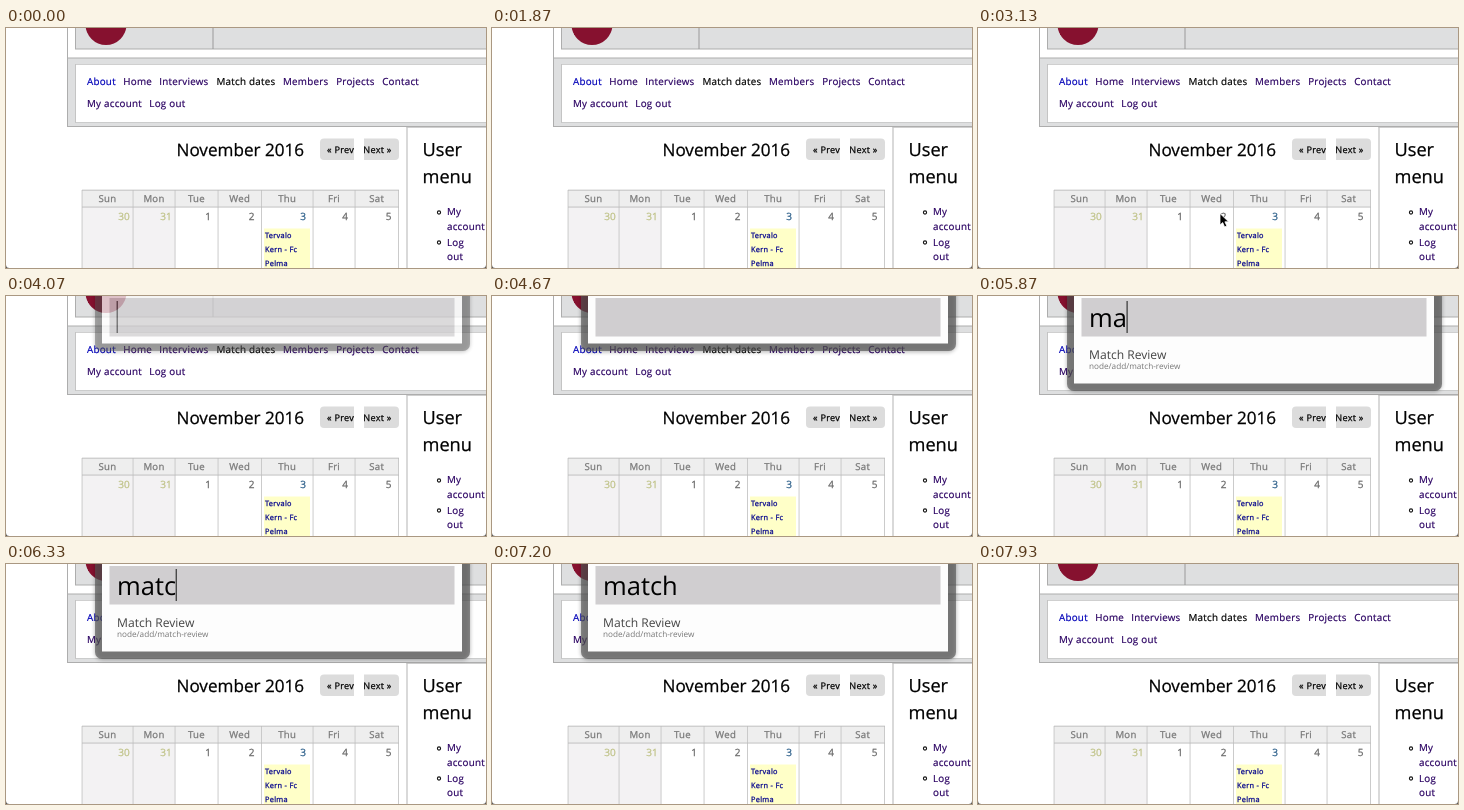
Animation of 480x240 px, one loop 8000 ms. Source, as an HTML page:

```html
<!DOCTYPE html>
<html lang="en">
<head>
<meta charset="utf-8">
<title>Quick search over a calendar page</title>
<style>
  html, body { margin: 0; width: 100%; height: 100%; overflow: hidden; background: #fff; }
  svg { display: block; width: 100vw; height: 100vh; }
  text { font-family: "Open Sans", "Noto Sans", sans-serif; white-space: pre; text-rendering: geometricPrecision; }
  .link { font-size: 9.8px; letter-spacing: .25px; stroke: currentColor; stroke-width: .2px; }
  .bold { stroke: currentColor; stroke-width: .25px; }
  .small { letter-spacing: .28px; }
</style>
</head>
<body>
<svg id="stage" viewBox="0 0 480 240" xmlns="http://www.w3.org/2000/svg">
  <defs>
    <filter id="soft" x="-10%" y="-30%" width="120%" height="160%">
      <feGaussianBlur stdDeviation="2.2"/>
    </filter>
  </defs>
  <g id="page"></g>
  <g id="popup">
    <rect id="shade" x="89" y="-20" width="375" rx="8" fill="#000" opacity=".3" filter="url(#soft)"/>
    <rect id="frame" x="89" y="-20" width="375" rx="7" fill="#555" opacity=".65"/>
    <rect id="panel" x="96" y="-20" width="360" fill="#fdfdfd"/>
    <rect x="103.5" y="2" width="345" height="38.5" fill="#d0ced0"/>
    <text id="query" x="111" y="30.5" font-size="25.5" fill="#000"></text>
    <rect id="caret" y="5" width="1.2" height="32" fill="#333"/>
    <g id="result">
      <text x="111" y="63" font-size="12.1" fill="#444">Match Review</text>
      <text x="111" y="73.3" font-size="8.2" fill="#777">node/add/match-review</text>
    </g>
  </g>
  <path id="pointer" d="M0 0V11.6L2.7 9.1L4.6 13.4L6.8 12.4L4.9 8.3H8.6Z" fill="#000" stroke="#fff" stroke-width=".8"/>
  <path d="M0 236.5V240H3.5Q0 240 0 236.5ZM480 236.5V240H476.5Q480 240 480 236.5Z" fill="#555"/>
</svg>
<script>
const LOOP = 8000;
const $ = id => document.getElementById(id);
const page = $('page');

function add(tag, attrs, content) {
  const el = document.createElementNS('http://www.w3.org/2000/svg', tag);
  for (const key in attrs) el.setAttribute(key, attrs[key]);
  if (content) el.textContent = content;
  page.appendChild(el);
}
const box = (x, y, width, height, fill) => add('rect', { x, y, width, height, fill });
const label = (x, y, content, size, fill, extra) =>
  add('text', { x, y, 'font-size': size, fill, color: fill, ...extra }, content);
const link = (x, y, content, fill) => add('text', { x, y, fill, color: fill, class: 'link' }, content);

const BAND = '#dedfe0', EDGE = '#adadad', VISITED = '#2a0062', NAVY = '#00008c';
const BOLD = { class: 'bold' };
const SMALL = { class: 'bold small' };
const CENTER = { 'text-anchor': 'middle' };

function drawHeader() {
  box(69, 0, 411, 21, BAND);
  box(69, 0, 1, 21, EDGE);
  box(69, 20.5, 411, 1, EDGE);
  box(206.5, 0, 1, 21, '#9a9a9a');
  box(61, 30, 419, 68.5, BAND);
  box(61, 0, 1, 99, EDGE);
  box(61, 29.5, 419, 1, EDGE);
  box(69, 36, 411, 58.5, '#fff');
  box(69, 36, 1, 58.5, '#c4c4c4');
  box(69, 36, 411, .8, '#c4c4c4');
  box(69, 94, 411, .8, '#c4c4c4');
  box(61, 98, 419, 1, EDGE);
  add('circle', { cx: 100, cy: -3.5, r: 20.5, fill: '#86112f' });

  link(81, 57, 'About', '#0000b8');
  link(117.3, 57, 'Home', VISITED);
  link(153.3, 57, 'Interviews', VISITED);
  link(210.5, 57, 'Match dates', '#000');
  link(277, 57, 'Members', VISITED);
  link(330.2, 57, 'Projects', VISITED);
  link(376.2, 57, 'Contact', VISITED);
  link(81, 79, 'My account', VISITED);
  link(143.3, 79, 'Log out', VISITED);
}

function drawCalendar() {
  label(170.5, 128, 'November 2016', 17.1, '#000', BOLD);
  add('path', { d: 'M348 110.5H318Q314 110.5 314 114.5V128Q314 132 318 132H348Z', fill: '#dcdcdc' });
  add('path', { d: 'M358 110.5H389Q393 110.5 393 114.5V128Q393 132 389 132H358Z', fill: '#dcdcdc' });
  label(321, 125, '« Prev', 9.1, '#000', SMALL);
  label(357.3, 125, 'Next »', 9.1, '#000', SMALL);

  const edges = [76, 127, 169, 212, 255.5, 307, 349, 392.5];
  const names = ['Sun', 'Mon', 'Tue', 'Wed', 'Thu', 'Fri', 'Sat'];
  const days = [30, 31, 1, 2, 3, 4, 5];
  box(76, 162, 317, 17, '#eee');
  box(76, 179, 93, 61, '#f3f2f3');
  box(258, 200.5, 46, 39.5, '#ffffc8');
  names.forEach((name, i) => {
    const left = edges[i], right = edges[i + 1];
    label((left + right) / 2, 174, name, 9.6, '#777', { ...CENTER, ...SMALL });
    const tone = i < 2 ? '#bfc287' : i === 4 ? '#2c5f8a' : '#666';
    label(right - (i < 2 ? 9 : 10), 192, days[i], 10, tone, { ...CENTER, ...BOLD });
  });
  edges.forEach(x => box(x - .4, 162, .9, 78, '#c6c6c6'));
  box(76, 161.7, 317, .9, '#bbb');
  box(76, 178.6, 317, .9, '#bbb');
  ['Tervalo', 'Kern - Fc', 'Pelma'].forEach((line, i) =>
    label(259, 210 + i * 14.2, line, 7.4, NAVY, SMALL));
}

function drawSidebar() {
  box(400.5, 99, 1, 141, '#b4b4b4');
  box(400.5, 99, 79.5, .8, '#c4c4c4');
  label(416.5, 127.5, 'User', 18.2, '#000', BOLD);
  label(416.5, 154.5, 'menu', 18.2, '#000', BOLD);
  ['My', 'account', 'Log', 'out'].forEach((word, i) =>
    link(441, [187, 201.5, 217.5, 232][i], word, VISITED));
  [184.5, 214.5].forEach(cy =>
    add('circle', { cx: 433, cy, r: 1.6, fill: 'none', stroke: '#111', 'stroke-width': 1.1 }));
}

const clamp = v => Math.max(0, Math.min(1, v));
const ramp = (t, from, to) => clamp((t - from) / (to - from));
const ease = v => v * v * (3 - 2 * v);

const WORD = 'match';
const KEYS = [5500, 5800, 6070, 6270, 6530];
const OPEN = 3870, RESULTS = 5730, CLOSE = 7330;

function render(t) {
  const fade = ramp(t, OPEN, 4140) * (1 - ramp(t, CLOSE, 7600));
  const typed = KEYS.filter(k => t >= k).length;
  const listed = t >= RESULTS;
  const bottom = listed ? 95 : 55;

  $('popup').setAttribute('opacity', fade);
  $('shade').setAttribute('height', bottom + 21);
  $('frame').setAttribute('height', bottom + 20);
  $('panel').setAttribute('height', bottom - 7.5 + 20);
  $('result').setAttribute('visibility', listed ? 'visible' : 'hidden');

  const query = $('query');
  query.textContent = WORD.slice(0, typed);
  $('caret').setAttribute('x', 110.6 + (typed ? query.getComputedTextLength() : 0));
  const since = t - (typed ? KEYS[typed - 1] : OPEN);
  $('caret').setAttribute('opacity', since % 1000 < 500 ? 1 : 0);

  // The pointer comes in from below, rests, then leaves again.
  const enter = ease(ramp(t, 2600, 3000)), leave = ease(ramp(t, 3150, 3400));
  const x = 206 + 36 * enter + 20 * leave;
  const y = 242 - 56.5 * enter + 58 * leave;
  $('pointer').setAttribute('transform', `translate(${x} ${y})`);
}

drawHeader();
drawCalendar();
drawSidebar();

const start = performance.now();
function tick() {
  render((performance.now() - start) % LOOP);
  requestAnimationFrame(tick);
}
tick();
</script>
</body>
</html>
```
